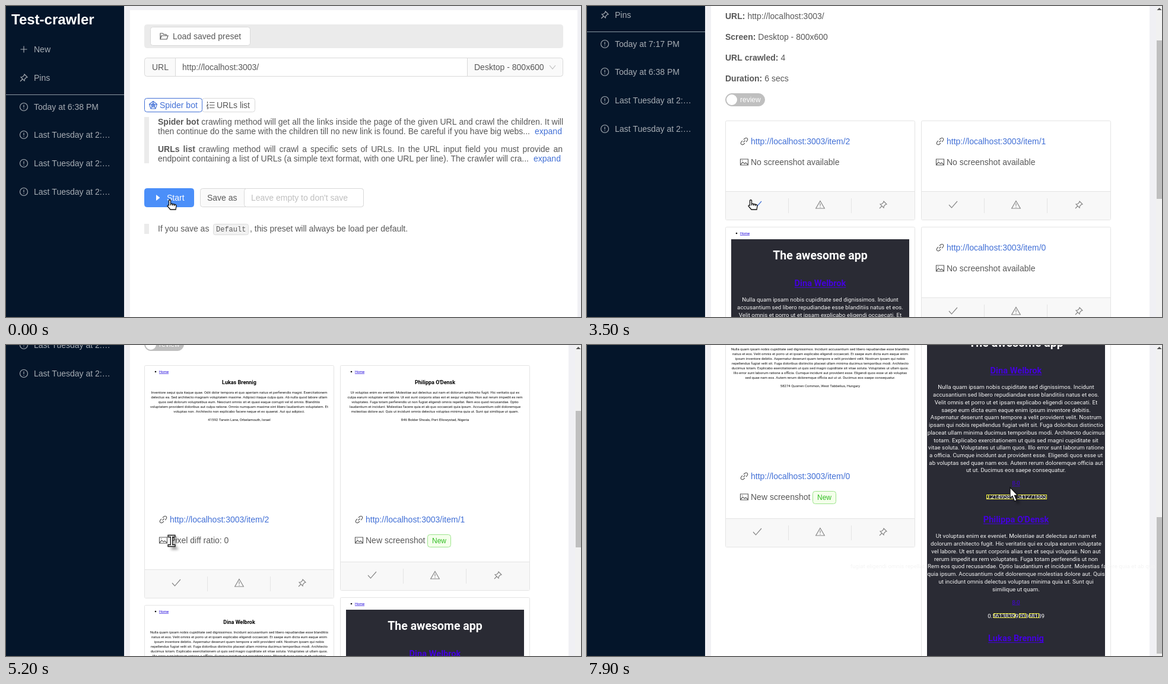
Recreate the animation shown at these times as an HTML page with a canvas. Size 969 px wide and 524 px high, loop 8000 ms.

```html
<!DOCTYPE html>
<html lang="en">
<head>
<meta charset="utf-8">
<title>Test-crawler</title>
<style>
html, body { margin: 0; width: 100%; height: 100%; overflow: hidden; background: #f0f0f4; }
canvas { display: block; }
</style>
</head>
<body>
<canvas id="stage" width="969" height="524"></canvas>
<script>
const ctx = document.getElementById('stage').getContext('2d');
const W = 969, H = 524, LOOP = 8000, STEP = 100;
const SANS = '"Liberation Sans", Arial, sans-serif';
const MONO = '"Liberation Mono", monospace';
const ROBOTO = 'Roboto, sans-serif';
const GREY = '#595959', LINE = '#d9d9d9', BLUE = '#4270d6', PALE = '#a7adb4', VIOLET = '#4300dc';

// In each body "|" breaks the narrow text and "/" the wide one.
const PEOPLE = {
  dina: {
    name: 'Dina Welbrok', address: '58274 Quorren Common, West Tabbelius, Hungary',
    body: 'Nulla quam ipsam nobis cupiditate sed dignissimos. Incidunt/accusantium sed libero repudiandae esse blanditiis|natus et eos./Velit omnis et porro ut et ipsam explicabo eligendi occaecati. Et/saepe eum dicta eum eaque enim|ipsum inventore debitis./Aspernatur deserunt quam tempore a velit provident velit. Nostrum/ipsam qui nobis|repellendus fugiat velit sit. Fuga doloribus distinctio/placeat ullam minima ducimus temporibus modi. Architecto|ducimus/totam. Explicabo exercitationem ut quis sed magni cupiditate sit/vitae soluta. Voluptates ut ullam quos.|Illo error sunt laborum ratione/a officia. Cumque incidunt aut provident esse. Eligendi quos esse ut/ab voluptas|sed quae nam eos. Autem rerum doloremque officia aut/ut ut. Ducimus eos saepe consequatur.'
  },
  philippa: {
    name: "Philippa O'Densk", address: '846 Bolder Shoals, Port Ellowystad, Nigeria',
    body: 'Ut voluptas enim ex eveniet. Molestiae aut delectus aut nam et/dolorum architecto fugit. Hic veritatis qui ex|culpa earum voluptate/vel labore. Ut est sunt corporis alias est et sequi voluptas. Non aut/rerum impedit ex rem|voluptates. Fuga totam perferendis ut non/fugiat eligendi omnis repellat. Rem eos quod recusandae. Optio|laudantium et incidunt. Molestias facere quia et ab quo occaecati/quia ipsum. Accusantium odit doloremque|molestias dolore aut. Quis/ut incidunt omnis delectus voluptas minima quia ut. Sunt qui/similique ut quam.'
  },
  lukas: {
    name: 'Lukas Brennig', address: '41592 Tarwin Lane, Orbelamouth, Israel',
    body: 'Inventore sequi quia itaque quae. Odit dolor tempora et quo aperiam natus et perferendis magni. Exercitationem|delectus ea. Sed architecto magnam voluptatem maxime. Adipisci itaque culpa quis. Ab nulla quod labore ullam|quos sed dolorum voluptatibus eum. Nesciunt omnis sit et quasi eaque corrupti vel id omnis. Blanditiis|voluptatem provident doloribus aut culpa ratione. Omnis numquam maxime sint libero laudantium voluptatem. Et|voluptas non. Architecto non explicabo facere neque et ex quaerat. Aut qui adipisci.'
  }
};
const narrowLines = p => p.body.replaceAll('/', ' ').split('|');
const wideLines = p => p.body.replaceAll('|', ' ').split('/');

const ICONS = {
  plus: 'M-5.5 0H5.5M0-5.5V5.5',
  pin: 'M1-6L6-1L4-.5L1.5 2L1 5L-5-1L-2-1.5L.5-4ZM-2 2L-6 6',
  alert: 'M6.5 0A6.5 6.5 0 1 1-6.5 0A6.5 6.5 0 1 1 6.5 0M0-3.5V1M0 2.5V3.8',
  spin: 'M0-6A6 6 0 0 1 6 0',
  folder: 'M-6 5V-5H-2L0-3H4V-1M-6 5L-4-1H7L5 5Z',
  down: 'M-5-3L0 3L5-3',
  spider: 'M0-6.5L6.5-1.5L4 6H-4L-6.5-1.5ZM0-3L3-.7L2 3H-2L-3-.7ZM0-6V0L6-1.5M0 0L4 6M0 0L-4 6M0 0L-6-1.5',
  list: 'M-2-4.5H6.5M-2 0H6.5M-2 4.5H6.5M-5.5-6V-3M-6.5-1H-4.5L-6.5 1.5H-4.5M-6.5 3.5H-4.5V6H-6.5',
  rerun: 'M-5 1V-3.5H5M3-5.5L5.2-3.5L3-1.5M5-1V3.5H-5M-3 1.5L-5.2 3.5L-3 5.5',
  link: 'M-1.5 1.5L1.5-1.5M-1-3L1.5-5.2Q3.5-6.5 5.2-4.8Q6.5-3 5-1.2L3 1M1 3L-1.5 5.2Q-3.5 6.5-5.2 4.8Q-6.5 3-5 1.2L-3-1',
  image: 'M-6.5-5H6.5V5H-6.5ZM-6 4L-2.5 0L.5 2.8L2.5 1L6 4M-3.8-2.7H-2.8',
  check: 'M-7 0L-2.5 5L7-6',
  warn: 'M0-6.5L7.3 6H-7.3ZM0-2.5V1.8M0 3.2V4.4'
};
for (const key in ICONS) ICONS[key] = new Path2D(ICONS[key]);

const CURSORS = {
  hand: { dx: -2, dy: -3, shadow: 0, path: 'M-2.5 9V.5Q-1-1 .5.5V6L8 7.5Q10 8 10 10L9 16H0L-5 10Q-5 8-2.5 9Z' },
  beam: { dx: 0, dy: 0, shadow: .45, path: 'M-6-9.5H6V-6.5H1.7V6.5H6V9.5H-6V6.5H-1.7V-6.5H-6Z' },
  arrow: { dx: 0, dy: 0, shadow: .45, path: 'M0 0V18L4 14.5L7.5 23L11 21.5L7.5 13.5H13Z' }
};

const SCROLL = [[2400, 0], [3500, 106], [4200, 265], [6900, 265], [7400, 517], [7900, 742]];
const POINTER_X = [[6300, 279], [6400, 285], [6500, 395], [6600, 428], [7400, 428], [7900, 713]];
const POINTER_Y = [[6300, 330], [6400, 327], [6500, 342], [6600, 324], [7400, 324], [7900, 240]];
const SLIDE = [[4200, 0], [4300, .3], [4400, .737], [4500, 1]];
const dropBy = early => [[4300, 0], [4400, early], [4600, .85], [4800, 1]];

function track(keys, t) {
  if (t <= keys[0][0]) return keys[0][1];
  for (let i = 1; i < keys.length; i++) {
    const [t0, a] = keys[i - 1], [t1, b] = keys[i];
    if (t <= t1) return a + (b - a) * (t - t0) / (t1 - t0);
  }
  return keys.at(-1)[1];
}
const mix = (a, b, k) => a + (b - a) * k;

function rect(x, y, w, h, fill) {
  ctx.fillStyle = fill;
  ctx.fillRect(x, y, w, h);
}

function box(x, y, w, h, radius, fill, stroke) {
  ctx.beginPath();
  ctx.roundRect(x + .5, y + .5, w - 1, h - 1, radius);
  ctx.fillStyle = fill;
  ctx.fill();
  ctx.strokeStyle = stroke;
  ctx.lineWidth = 1;
  ctx.stroke();
}

// y is the middle of the capitals; returns the right end.
function text(s, x, y, color = GREY, size = 14, weight = '', family = SANS) {
  ctx.font = `${weight} ${size}px ${family}`;
  ctx.fillStyle = color;
  ctx.fillText(s, x, y + Math.round(size * .35));
  return x + ctx.measureText(s).width;
}

function justified(s, boldCount, x, y, width) {
  const words = s.split(' ').map((word, i) => {
    const weight = i < boldCount ? 'bold' : '';
    ctx.font = `${weight} 14px ${SANS}`;
    return { word, weight, width: ctx.measureText(word).width };
  });
  const gap = (width - words.reduce((sum, w) => sum + w.width, 0)) / (words.length - 1);
  for (const w of words) x = text(w.word, x, y, GREY, 14, w.weight) + gap;
}

function icon(name, x, y, color = GREY, angle = 0) {
  ctx.save();
  ctx.translate(x, y);
  ctx.rotate(angle);
  ctx.strokeStyle = color;
  ctx.lineWidth = 1.15;
  ctx.stroke(ICONS[name]);
  ctx.restore();
}

// Text inside a page thumbnail, centred, at 3/8 of its page size.
function thumbText(s, x, y, size, color, weight = '', underline = false) {
  ctx.save();
  ctx.translate(x, y);
  ctx.scale(.375, .375);
  ctx.font = `${weight} ${size}px ${ROBOTO}`;
  ctx.textAlign = 'center';
  ctx.fillStyle = color;
  ctx.fillText(s, 0, size * .355);
  if (underline) {
    const w = ctx.measureText(s).width;
    ctx.fillRect(-w / 2, size * .46, w, Math.max(2, size * .07));
  }
  ctx.restore();
}

function drawSidebar(t) {
  rect(0, 0, 199, H, '#04152a');
  ctx.save();
  ctx.translate(0, -Math.round(track(SCROLL, t)));
  text('Test-crawler', 9, 23, '#fff', 24, 'bold');
  icon('plus', 30, 73, PALE);
  text('New', 47, 73, PALE);
  icon('pin', 30, 121, PALE);
  text('Pins', 47, 121, PALE);
  rect(0, 149, 199, 1, '#8d97a2');
  const last = 'Last Tuesday at 2:…';
  const runs = ['Today at 6:38 PM', last, last, last];
  if (t >= 600) runs.splice(0, 4, 'Today at 7:17 PM', 'Today at 6:38 PM', last, last);
  runs.forEach((label, i) => {
    const y = [170, 217, 265, 313][i];
    const busy = i === 0 && t >= 600 && t < 1500;
    icon(busy ? 'spin' : 'alert', 30, y, PALE, busy ? t / 160 : 0);
    text(label, 47, y, PALE);
  });
  ctx.restore();
}

function drawForm(t) {
  box(233, 31, 706, 40, 4, '#ebebeb', '#ebebeb');
  box(243, 35, 169, 32, 4, '#fff', LINE);
  icon('folder', 266, 51);
  text('Load saved preset', 281, 51);

  box(233, 87, 706, 32, 4, '#fafafa', LINE);
  box(285, 87, 493, 32, 0, '#fff', LINE);
  text('URL', 246, 103);
  text('http://localhost:3003/', 297, 103);
  text('Desktop - 800x600', 789, 103);
  icon('down', 921, 103, '#bfbfbf');

  box(330, 155, 90, 24, 4, '#fff', LINE);
  box(233, 155, 98, 24, 4, '#fff', BLUE);
  icon('spider', 248, 167, BLUE);
  text('Spider bot', 259, 167, BLUE);
  icon('list', 345, 167);
  text('URLs list', 355, 167);

  rect(233, 187, 8, 78, '#ebebeb');
  justified('Spider bot crawling method will get all the links inside the page of the given URL and crawl the children. It will', 2, 256, 195, 683);
  justified('then continue do the same with the children till no new link is found. Be careful if you have big webs...', 0, 256, 211, 627);
  text('expand', 891, 211, BLUE);
  justified('URLs list crawling method will crawl a specific sets of URLs. In the URL input field you must provide an', 2, 256, 241, 682);
  justified('endpoint containing a list of URLs (a simple text format, with one URL per line). The crawler will cra...', 0, 256, 257, 625);
  text('expand', 889, 257, BLUE);

  const press = t === 200 ? '#3470dc' : t === 300 ? '#4081ec' : '#4b8ff9';
  box(233, 307, 84, 32, 4, press, press);
  ctx.fillStyle = '#fff';
  ctx.fill(new Path2D('M253 318L259.5 323L253 328Z'));
  text('Start', 271, 323, '#fff');
  box(327, 307, 276, 32, 4, '#fafafa', LINE);
  box(401, 307, 202, 32, 4, '#fff', LINE);
  text('Save as', 339, 323);
  text("Leave empty to don't save", 413, 323, '#bfbfbf');

  rect(233, 367, 8, 17, '#ebebeb');
  text('If you save as', 256, 375);
  box(349, 367, 60, 19, 3, '#f2f2f2', '#dcdcdc');
  text('Default', 354, 376, GREY, 12, '', MONO);
  text(', this preset will always be load per default.', 411, 375);
}

function drawSummary(t) {
  text('Today at 7:17 PM', 233, 47, '#262626', 24, 'bold');
  box(233, 75, 81, 24, 4, '#fff', LINE);
  icon('rerun', 248, 87);
  text('Re-run', 263, 87);
  const done = Math.min(1, (t - 600) / 900);
  const fields = [
    ['URL:', 'http://localhost:3003/'],
    ['Screen:', 'Desktop - 800x600'],
    ['URL crawled:', Math.floor(done * 4)],
    ['Duration:', Math.floor(done * 6) + ' secs']
  ];
  fields.forEach(([label, value], i) => {
    const y = 123 + i * 35;
    text(value, text(label, 233, y, GREY, 14, 'bold') + 4, y);
  });
  box(233, 253, 67, 22, 11, '#bfbfbf', '#bfbfbf');
  ctx.beginPath();
  ctx.arc(244, 264, 9, 0, Math.PI * 2);
  ctx.fillStyle = '#fff';
  ctx.fill();
  text('review', 258, 264, '#fff', 12);
}

function drawHomeLink(x, y) {
  ctx.beginPath();
  ctx.arc(x + 19, y + 11, 1.3, 0, Math.PI * 2);
  ctx.fillStyle = '#111';
  ctx.fill();
  thumbText('Home', x + 33, y + 11, 16, '#1c00dc', '', true);
}

function drawItem(x, y, id, person, loaded, pointer) {
  const isFirst = id === 2;
  const height = !loaded ? 168 : isFirst ? 393 : 380;
  const linkY = y + (loaded ? 260 : 35), noteY = linkY + 35, barY = y + height - 49;
  box(x, y, 320, height, 2, '#fff', '#e4e4e4');
  if (loaded) {
    const mid = x + 160, lines = narrowLines(person);
    drawHomeLink(x, y);
    thumbText(person.name, mid, y + 28.5, 24, '#000', 'bold');
    lines.forEach((line, i) => thumbText(line, mid, y + 46 + i * 7.9, 16, '#111'));
    thumbText(person.address, mid, y + 60 + (lines.length - 1) * 7.9, 16, '#111');
  }
  const onLink = isFirst && !loaded && Math.abs(pointer.y - linkY) < 10;
  const onCheck = isFirst && !loaded && pointer.y > barY && pointer.y < barY + 49;
  icon('link', x + 32, linkY);
  text('http://localhost:3003/item/' + id, x + 43, linkY, onLink ? '#6090ea' : BLUE);
  icon('image', x + 32, noteY);
  const note = !loaded ? 'No screenshot available' : isFirst ? 'Pixel diff ratio: 0' : 'New screenshot';
  text(note, x + 43, noteY);
  if (loaded && !isFirst) {
    box(x + 147, noteY - 10, 40, 22, 4, '#f4ffeb', '#9ce48c');
    text('New', x + 155, noteY + 1, '#32bd24', 12);
  }
  rect(x + 1, barY, 318, 48, '#f8f8f8');
  rect(x + 1, barY, 318, 1, '#e4e4e4');
  ['check', 'warn', 'pin'].forEach((name, i) => {
    icon(name, x + 54 + i * 106, barY + 23, i === 0 && onCheck ? BLUE : '#858585');
    if (i) rect(x + i * 106, barY + 12, 1, 25, '#e4e4e4');
  });
}

function drawAppCard(x, y) {
  const mid = x + 160;
  box(x, y, 320, 1100, 2, '#fff', '#e4e4e4');
  drawHomeLink(x, y);
  rect(x + 10, y + 21, 300, 1000, '#2a2b34');
  thumbText('The awesome app', mid, y + 48, 52, '#fff', 'bold');
  const sections = [
    [PEOPLE.dina, '0.21495841541271665', [[-50, 102], [-50, 4]]],
    [PEOPLE.philippa, '0.5613839920368189', [[-38, 37], [5, 12], [22, 17]]],
    [PEOPLE.lukas, '', []]
  ];
  let top = y + 95;
  for (const [person, number, marks] of sections) {
    thumbText(person.name, mid, top, 39, VIOLET, 'bold', true);
    if (!number) break;
    const lines = wideLines(person);
    lines.forEach((line, i) => thumbText(line, mid, top + 28 + i * 12.73, 26, '#f4f4f4'));
    const end = top + 28 + (lines.length - 1) * 12.73;
    thumbText('8-0', mid, end + 22, 26, VIOLET, '', true);
    thumbText(number, mid, end + 45, 26, '#fff');
    ctx.strokeStyle = '#f0f03c';
    ctx.lineWidth = 1;
    for (const [dx, w] of marks) ctx.strokeRect(mid + dx + .5, Math.round(end) + 41.5, w - 1, 7);
    top = end + 83;
  }
}

function drawCards(t, pointer) {
  const loaded = t >= 4300;
  const slide = track(SLIDE, t);
  drawItem(233, 299, 2, PEOPLE.lukas, loaded, pointer);
  drawItem(563, 299, 1, PEOPLE.philippa, loaded, pointer);
  drawAppCard(Math.round(mix(233, 563, slide)), Math.round(mix(478, 690, track(dropBy(.198), t))));
  drawItem(Math.round(mix(563, 233, slide)), Math.round(mix(478, 703, track(dropBy(.218), t))), 0, PEOPLE.dina, loaded, pointer);
}

function drawScrollbar(x, w, arrowY, top, height) {
  rect(x, 0, w, H, '#f1f1f1');
  rect(x + 1, top, w - 2 + (x > 950), height, '#bfbfbf');
  const mid = x + w / 2 + .5;
  ctx.fillStyle = '#505050';
  ctx.fill(new Path2D(`M${mid - 4} ${arrowY + 2}H${mid + 4}L${mid} ${arrowY - 2}Z`));
}

function drawCursor(t, pointer) {
  const shape = CURSORS[t < 4200 ? 'hand' : t < 6500 ? 'beam' : 'arrow'];
  const path = new Path2D(shape.path);
  ctx.save();
  ctx.translate(pointer.x + shape.dx, pointer.y + shape.dy);
  ctx.shadowColor = `rgba(0,0,0,${shape.shadow})`;
  ctx.shadowBlur = 4;
  ctx.shadowOffsetX = ctx.shadowOffsetY = 5;
  ctx.fillStyle = '#fff';
  ctx.fill(path);
  ctx.shadowColor = 'transparent';
  ctx.strokeStyle = '#111';
  ctx.lineWidth = 1.3;
  ctx.stroke(path);
  if (shape === CURSORS.hand) ctx.stroke(new Path2D('M.5 6V9M3.5 7V9.5M6.5 7.5V10'));
  ctx.restore();
}

function draw(t) {
  const scroll = Math.round(track(SCROLL, t));
  const pointer = { x: Math.round(track(POINTER_X, t)), y: Math.round(track(POINTER_Y, t)) };
  const split = t >= 1500 && t < 2500;
  const right = t < 1500 ? 963 : split ? 933 : 948;

  rect(0, 0, W, H, '#f0f0f4');
  ctx.save();
  ctx.translate(0, -scroll);
  rect(209, 7, right - 209, 1600, '#fff');
  if (t < 600) drawForm(t);
  else drawSummary(t);
  if (t >= 1500) {
    ctx.globalAlpha = Math.min(1, (t - 1400) / 600);
    drawCards(t, { x: pointer.x, y: pointer.y + scroll });
  }
  ctx.restore();

  drawSidebar(t);
  if (split) {
    drawScrollbar(934, 13, 15, 22, 410);
    rect(934, 0, 14, 7, '#f0f0f4');
  }
  if (t >= 1500) {
    const [rate, height] = split ? [0, 469] : t < 4300 ? [.434, 267] : [.375, 230];
    drawScrollbar(959, 10, 5, Math.round(12 + scroll * rate), height);
  }
  drawCursor(t, pointer);
}

const start = performance.now();
function tick() {
  const t = (performance.now() - start) % LOOP;
  draw(Math.floor(t / STEP) * STEP);
  requestAnimationFrame(tick);
}
tick();
</script>
</body>
</html>
```
